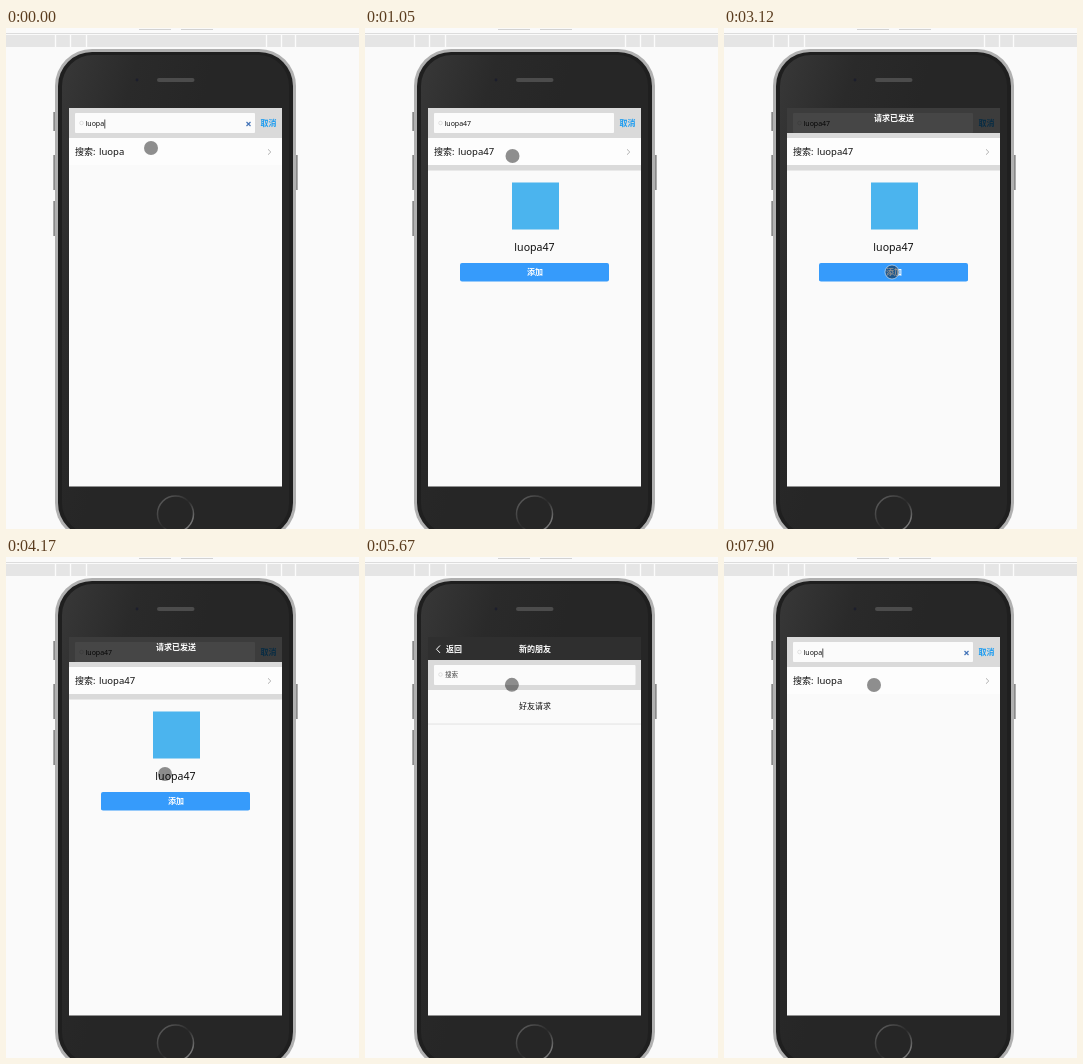
Animation, 353 px wide and 501 px high, one loop 8000 ms. Source, as an HTML page:

```html
<!DOCTYPE html>
<html lang="zh-CN">
<head>
<meta charset="utf-8">
<title>Friend search</title>
<style>
  html, body { margin: 0; width: 100%; height: 100%; overflow: hidden; background: #fafafa; }
  svg { display: block; width: 353px; height: 501px; }
  text { font: 8px "Noto Sans", "Noto Sans CJK SC", "Noto Sans CJK", sans-serif; fill: #111; }
  .bold { font-weight: 700; }
  .mid { text-anchor: middle; }
  .white { fill: #fff; }
  .small { font-size: 7px; }
  .hint { font-size: 6.6px; fill: #444; }
  .label { font-size: 9.5px; }
  .bar { fill: #dadada; }
  .field { fill: #fbfbfb; }
  .lens { fill: none; stroke: #d0d0d0; stroke-width: .6; }
</style>
</head>
<body>
<svg viewBox="0 0 353 501">
  <defs>
    <linearGradient id="body" x2=".5" y2=".3">
      <stop stop-color="#383838"/>
      <stop offset=".5" stop-color="#2a2a2a"/>
      <stop offset="1" stop-color="#262626"/>
    </linearGradient>
    <linearGradient id="home" x2="1" y2="1">
      <stop stop-color="#666"/>
      <stop offset=".5" stop-color="#2a2a2a"/>
      <stop offset="1" stop-color="#999"/>
    </linearGradient>
  </defs>

  <!-- window behind the phone -->
  <path d="M133 1.5h32M175 1.5h32" stroke="#d2d2d2"/>
  <path d="M0 5.5h353" stroke="#dcdcdc"/>
  <rect y="7" width="353" height="12" fill="#e5e5e5"/>
  <path d="M49.5 7v12m15-12v12m16-12v12m180-12v12m15-12v12m14-12v12" stroke="#fcfcfc" stroke-width="1.3"/>

  <!-- phone -->
  <path d="M49 84v19m0 24v35m0 11v35M290 127v35" stroke="#8a8a8a" stroke-width="3.4"/>
  <rect x="49" y="21" width="241" height="491" rx="37" fill="#b0b0b0"/>
  <rect x="52" y="24" width="235" height="485" rx="34" fill="#1f1f1f"/>
  <rect x="56" y="27" width="227" height="479" rx="31" fill="url(#body)"/>
  <rect x="151" y="50" width="37.5" height="4" rx="2" fill="#4c4c4c"/>
  <circle cx="131" cy="52" r="1.4" fill="#1c1e2c"/>
  <circle cx="169.5" cy="486" r="18" fill="none" stroke="url(#home)" stroke-width="1.5"/>
  <rect x="63" y="80" width="213" height="378.5" fill="#fafafa"/>

  <g id="search">
    <rect class="bar" x="63" y="80" width="213" height="30"/>
    <rect class="field" x="69" y="85" width="180" height="20" rx="1"/>
    <circle class="lens" cx="75.5" cy="95" r="1.8"/>
    <text id="hint" class="hint" x="80" y="97.8">搜索</text>
    <text id="query" class="small" x="79.5" y="98"></text>
    <g id="focus">
      <path id="caret" d="M0 91.5v9" stroke="#222" stroke-width=".8"/>
      <path d="M240.500 94l4 4m0-4l-4 4" stroke="#4474b8" stroke-width="1.2"/>
    </g>
    <text class="bold" x="254.5" y="98" style="fill:#1c9cf0">取消</text>
    <g id="row">
      <rect x="63" y="110" width="213" height="27" fill="#fdfdfd"/>
      <text x="69" y="127.300" style="font-size:9px">搜索:</text>
      <text id="label" class="label" x="93" y="127.300"></text>
      <path d="M262 121.300l2.800 2.700-2.800 2.700" fill="none" stroke="#aaa" stroke-width=".9"/>
    </g>
    <g id="result">
      <rect class="bar" x="63" y="137" width="213" height="5.5"/>
      <rect x="147" y="154.5" width="47" height="47" fill="#4bb4ee"/>
      <text id="name" class="mid" x="169.5" y="222.5" style="font-size:10.6px"></text>
      <rect x="95" y="235" width="149" height="18.5" rx="2" fill="#369bfb"/>
      <text class="bold mid white" x="170" y="247">添加</text>
    </g>
  </g>

  <g id="list">
    <rect x="63" y="80" width="213" height="23" fill="#2f2f2f"/>
    <path d="M75 88.500l-3.500 3.700 3.500 3.700" fill="none" stroke="#fff"/>
    <text class="bold white" x="81" y="94.800">返回</text>
    <text class="bold mid white" x="170" y="94.800">新的朋友</text>
    <rect class="bar" x="63" y="103" width="213" height="30"/>
    <rect class="field" x="69" y="108" width="201.5" height="20" rx="1"/>
    <circle class="lens" cx="75.5" cy="117.5" r="1.8"/>
    <text class="hint" x="80" y="120.300">搜索</text>
    <text class="mid" x="170" y="152">好友请求</text>
    <path d="M63 167h213" stroke="#e2e2e2"/>
  </g>

  <g id="toast">
    <rect x="63" y="80" width="213" height="25" fill-opacity=".72"/>
    <text class="bold mid white" x="170" y="93">请求已发送</text>
  </g>
  <circle id="pointer" r="7" fill-opacity=".44"/>
</svg>

<script>
const LOOP = 8000, TICK = 150, USER = 'luopa47';
const FOUND = 900, SENT = 3120, LIST = 4620, REOPEN = 5820;
const $ = id => document.getElementById(id);

// pointer glides: start, ticks taken, end point
const home = { x: 145, y: 120 };
const glides = [
  [150, 7, 147.5, 128], [1350, 2, 118, 100], [1930, 4, 134, 104],
  [2520, 4, 168, 244], [3270, 3, 156, 216], [4170, 1, 159, 217],
  [4620, 4, 146, 187], [5220, 5, 147, 121], [7300, 5, 150, 128]
];

const within = (t, from, to) => t >= from && t < to;
const show = (id, on) => { $(id).style.display = on ? '' : 'none'; };
const ease = p => p * p * (3 - 2 * p);

// whole ticks begun since start, from 0 up to count
const ticks = (t, start, count) =>
  Math.max(0, Math.min(count, Math.floor((t - start) / TICK) + 1));

const letters = t => t < LIST
  ? 5 + ticks(t, 150, 2)
  : ticks(t, 6560, 2) + ticks(t, 7310, 3);

function pointerAt(t) {
  return glides.reduce((from, [start, count, x, y]) => {
    const p = ease(ticks(t, start, count) / count);
    return { x: from.x + (x - from.x) * p, y: from.y + (y - from.y) * p };
  }, home);
}

function draw(t) {
  const text = USER.slice(0, letters(t));
  const listOpen = within(t, LIST, REOPEN);
  const found = within(t, FOUND, LIST);
  const focused = text && !found;

  show('list', listOpen);
  show('search', !listOpen);
  show('row', text);
  show('result', found);
  show('hint', !text);
  show('focus', focused);
  show('toast', within(t, SENT, LIST));
  for (const id of ['query', 'label', 'name']) $(id).textContent = text;
  if (focused) {
    const end = 80.2 + $('query').getComputedTextLength();
    $('caret').setAttribute('transform', `translate(${end} 0)`);
  }

  const { x, y } = pointerAt(t);
  $('pointer').setAttribute('transform', `translate(${x} ${y})`);
  $('pointer').setAttribute('stroke', within(t, SENT - TICK, SENT + TICK) ? '#fff8' : 'none');
}

function tick() {
  draw(performance.now() % LOOP);
  requestAnimationFrame(tick);
}
tick();
</script>
</body>
</html>
```
